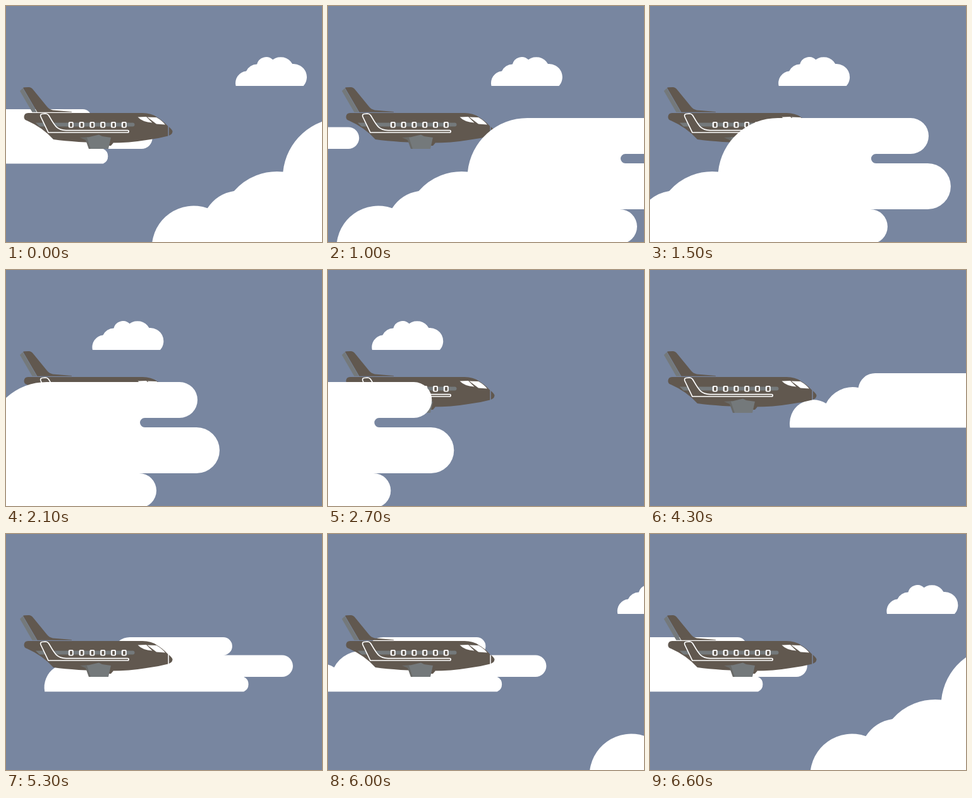
An HTML page for the animation above (6700 ms loop, 500x375 px).

```html
<!DOCTYPE html>
<html lang="en">
<head>
<meta charset="utf-8">
<title>Plane among clouds</title>
<style>
  html, body { margin: 0; width: 100%; height: 100%; overflow: hidden; background: #7886a0; }
  svg { display: block; width: 500px; height: 375px; }
  .brown { fill: #61584f; }
  .grey { fill: #74797b; }
  .white { fill: #fff; }
</style>
</head>
<body>
<svg viewBox="0 0 500 375">
  <path id="small" class="white" d="M363 127A19 19 0 0 1 379.5 103.5A19 19 0 0 1 396.5 92.5
    A15 15 0 0 1 421.5 85.3A21 21 0 0 1 452.5 92.1A21 21 0 0 1 470 127Z"/>
  <path id="back" class="white" d="M1 250.5A37.5 37.5 0 0 1 58 212A47 47 0 0 1 109 187
    A27 27 0 0 1 136 164H283.5a14.25 14.25 0 0 1 0 28.5H376.5a17.25 17.25 0 0 1 0 34.5
    H316A13 13 0 0 1 316 250.5Z"/>

  <g id="plane">
    <path class="brown" d="M27 130Q28 129 36 129Q40 129 43 133L65 160Q68 164 74 165.5L104 168V168.7H49.500Z"/>
    <path class="grey" d="M22 135L26.500 130.500L48.700 168.700H41.500Z"/>
    <path class="brown" d="M35 170H216Q230 170 238.500 176.500Q247 181 256.300 191V206.500Q240 211 222 213
      Q195 217.500 165 217.500Q110 217 75 212Q58 193 33 182Q28.500 181 28.500 176Q29 170 35 170Z"/>
    <path class="brown" d="M257.800 192Q263.500 197 263.500 199.500Q263 204 257.800 206Z"/>
    <path class="grey" d="M47 185.500H200.500a3 3 0 0 1 0 6H53Z"/>
    <path class="brown" d="M57.500 171.500Q53.500 172 55 176L67 201H192.500a1.700 1.700 0 0 0 0-3.400H95
      C80 197 77 190 68 174.500Q66 171 62 171Z" stroke="#fff" stroke-width="1.700"/>
    <g id="windows"></g>
    <path class="white" d="M208.500 176.500L222 176L231.500 185.500Q216 184.500 208.500 176.500Z
      M223.500 176.500L238 177Q247 182 252 188.500L238 187.500Z"/>
    <path fill="#696a68" d="M117 209L130 208L138 227H131L126 213Z"/>
    <path class="brown" d="M164 212H169.500V218L166 222H162Z"/>
    <path class="grey" d="M128 209L147 204.500L152 207L166 209L162 227H134Z"/>
  </g>

  <path id="front" class="white" d="M230 383.500A66 66 0 0 1 318 321.300A62 62 0 0 1 360 294
    A90 90 0 0 1 437.500 263.400A95 95 0 0 1 532 178H742a28.500 28.500 0 0 1 0 57
    H687a7.500 7.500 0 0 0 0 15H769a36.500 36.500 0 0 1 0 73H678a27.500 27.500 0 0 1 0 55V384Z"/>
</svg>
<script>
const LOOP = 6.7, FRAME = 0.1, SPACING = 1.1;

// Each cloud enters at `start` seconds and passes one point every SPACING seconds
const clouds = {
  small: { start: 5.5, path: [150, 12, -104.5, -226, -350, -480] },
  back: { start: 2.2, path: [680, 431, 202, 29.5, -145, -344.5, -560] },
  front: { start: 5.5, path: [287, 23.5, -216.5, -467.5, -723, -985] }
};

// Smooth curve through evenly spaced points
function spline(points, s) {
  const last = points.length - 1;
  const at = i => points[Math.min(Math.max(i, 0), last)];
  const i = Math.floor(Math.min(s, last)), u = Math.min(s, last) - i;
  const [a, b, c, d] = [at(i - 1), at(i), at(i + 1), at(i + 2)];
  return b + u / 2 * (c - a + u * (2 * a - 5 * b + 4 * c - d + u * (3 * (b - c) + d - a)));
}

document.getElementById("windows").innerHTML = Array.from({ length: 6 }, (_, i) => {
  const x = 98.8 + i * 16.8;
  return `<rect class="white" x="${x}" y="184" width="8" height="9.6" rx="2"/>
    <rect class="brown" x="${x + 2.3}" y="185.7" width="3.8" height="6.2" rx="1"/>`;
}).join("");

const begin = performance.now();

function draw() {
  const elapsed = (performance.now() - begin) / 1000;
  const time = Math.floor(elapsed % LOOP / FRAME) * FRAME;
  for (const [id, { start, path }] of Object.entries(clouds)) {
    const age = (time - start + LOOP) % LOOP;
    const x = spline(path, age / SPACING);
    document.getElementById(id).setAttribute("transform", `translate(${x} 0)`);
  }
  requestAnimationFrame(draw);
}
draw();
</script>
</body>
</html>
```
